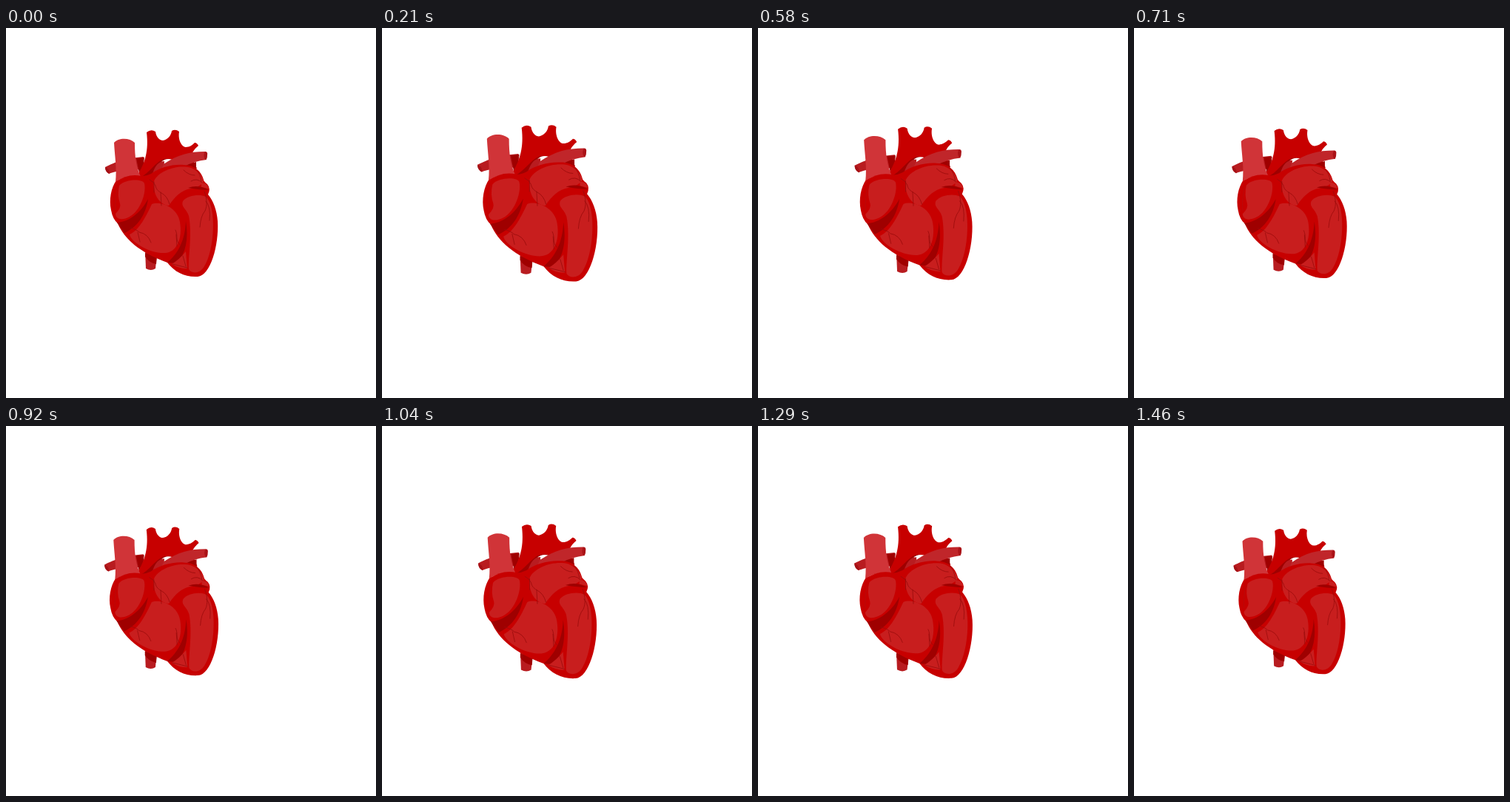
An HTML page with a canvas for the animation above (1500 ms loop, 500 by 500 pixels).

```html
<!DOCTYPE html>
<html lang="en">
<head>
<meta charset="utf-8">
<title>Beating heart</title>
<style>
  html, body { margin: 0; width: 100%; height: 100%; overflow: hidden; background: #fff; }
  canvas { display: block; width: 500px; height: 500px; }
</style>
</head>
<body>
<canvas id="stage" width="500" height="500"></canvas>
<script>
const ctx = document.getElementById('stage').getContext('2d');
const LOOP = 1500, STEPS = 36;
const CENTER = { x: 210.3, y: 237.2 };
const REST = 1.008; // scale at which the paths are drawn

const RED = '#c70000', LIGHT = '#c81e1e', PALE = '#d03438', VEIN = '#b81c20',
      DARK = '#9f0000', LINE = '#9a0c0c';

// Heart size by step: two quick contractions with a slow release between.
const BEAT = [[0, 1.008], [7, 1.1], [10, 1.071], [17, 1.028], [21, 1.006], [28, 1.1], [35, 1]];

const fill = (color, d) => ({ color, path: new Path2D(d) });
const stroke = (color, width, d) => ({ color, width, path: new Path2D(d) });

const vessels = [
  fill(VEIN, 'M188 300L189 325Q196 329 202 325L204 305Z'),
  fill(DARK, 'M188 304L204 308L203 319Q193 317 188 309Z'),
  fill(VEIN, 'M134 188C148 181 160 176 186 174L186 192C165 190 150 193 139 197Q134 194 134 188Z'),
  fill('#a51015', 'M134 188Q140 190 140 197Q134 195 134 188Z'),
  fill(DARK, 'M176 176L187 175L184 200L180 196Z'),
  fill(RED, 'M179 197C188 181 193 166 190 141Q196 136 202 140C203 148 208 152 212 152C218 151 223 146 224 139' +
    'Q229 136 234 140C232 152 238 161 243 161C248 161 252 158 255 155Q258 155 260 159' +
    'C253 165 250 170 252 176L258 190L182 204Z'),
  fill(DARK, 'M181 202C193 197 202 181 213 177Q220 176 225 178L210 196Z'),
  fill('#fff', 'M210 181Q216 175 225 178L213 184Z'),
  fill(VEIN, 'M198 197Q203 180 214 180L213 194Z'),
  fill(DARK, 'M237 186L257 181L257 193Z'),
  fill('#c0262a', 'M269 167C248 167 232 171 213 184L209 194L241 187Q254 180 271 178Z'),
  fill('#aa1217', 'M269 167Q273 167 272 172Q272 178 269 178Q266 172 269 167Z')
];

const muscle = [
  fill(RED, 'M149 206C142 216 139 232 142 246Q144 258 151 264C160 285 180 303 218 317C228 330 242 337 259 336' +
    'C276 335 288 294 286 261C285 246 280 233 273 225Q277 217 272 211Q267 207 267 205' +
    'C264 194 255 185 240 185C224 184 207 189 196 197Q188 201 181 200Z'),
  fill(DARK, 'M150 263C166 262 182 250 192 231C189 252 178 269 160 277Z'),
  fill(DARK, 'M243 261C242 288 232 305 218 317L231 318C243 305 247 284 243 261Z'),
  fill(PALE, 'M146 155C152 148 167 148 174 155C174 175 176 187 182 201Q165 197 148 208C150 190 147 174 146 155Z'),
  fill(RED, 'M148 208Q165 196 183 200L193 214L151 218Z'),
  fill(LIGHT, 'M153 213C160 204 185 203 187 210C190 222 182 247 167 255C156 261 148 258 148 251Q156 243 154 237Q150 226 153 213Z'),
  fill(LIGHT, 'M200 207C206 193 232 184 250 189C262 194 267 204 267 208Q262 215 250 217C237 219 228 228 220 240C207 239 198 224 200 207Z'),
  fill(LIGHT, 'M264 209Q273 210 274 217L264 215Z'),
  fill(DARK, 'M246 216Q260 211 274 219Q262 219 246 216Z'),
  fill(LIGHT, 'M197 238C208 233 232 242 235 262C239 286 230 303 215 304C195 305 169 290 167 279C180 273 189 255 197 238Z'),
  fill(LIGHT, 'M239 234C245 226 262 224 270 228C285 241 282 300 268 322C262 333 250 332 247 326C246 308 252 280 247 254C244 244 236 242 239 234Z'),
  fill(LIGHT, 'M224 319Q234 313 243 302L245 325Q235 326 224 319Z')
];

const veins = [
  stroke(LINE, 1, 'M194 205Q200 208 202 213C203 219 207 221 210 223Q218 227 221 238M209 222L210 240M200 208L200 222'),
  stroke(LINE, 1, 'M240 192Q247 199 255 199M250 207Q258 202 265 209M257 191Q263 198 264 207'),
  stroke(LINE, 1, 'M268 221C272 232 272 240 269 247Q263 254 262 269M270 234Q277 241 275 260'),
  stroke(LINE, 1, 'M168 270Q178 273 180 276Q192 278 196 290M178 276L181 289'),
  stroke(LINE, 1, 'M229 273C233 281 228 286 235 293M230 279L231 295'),
  stroke(LINE, 1, 'M225 319L245 324M239 308L243 322'),
  stroke('#b80c0c', 1, 'M151 215Q147 229 148 246')
];

const heart = [...vessels, ...muscle, ...veins];

function sizeAt(step) {
  const i = Math.max(1, BEAT.findIndex(([at]) => at >= step));
  const [t0, a] = BEAT[i - 1], [t1, b] = BEAT[i];
  return a + (b - a) * (step - t0) / (t1 - t0);
}

function draw(now) {
  const step = Math.floor((now % LOOP + 2) / LOOP * STEPS) % STEPS;
  const scale = sizeAt(step) / REST;
  ctx.setTransform(1, 0, 0, 1, 0, 0);
  ctx.fillStyle = '#fff';
  ctx.fillRect(0, 0, 500, 500);
  ctx.translate(CENTER.x, CENTER.y);
  ctx.scale(scale, scale);
  ctx.translate(-CENTER.x, -CENTER.y);
  ctx.lineCap = 'round';
  for (const { color, width, path } of heart) {
    if (width) {
      ctx.strokeStyle = color;
      ctx.lineWidth = width * 0.8;
      ctx.stroke(path);
    } else {
      ctx.fillStyle = color;
      ctx.fill(path);
    }
  }
}

const start = performance.now();
function tick() {
  draw(performance.now() - start);
  requestAnimationFrame(tick);
}
tick();
</script>
</body>
</html>
```
